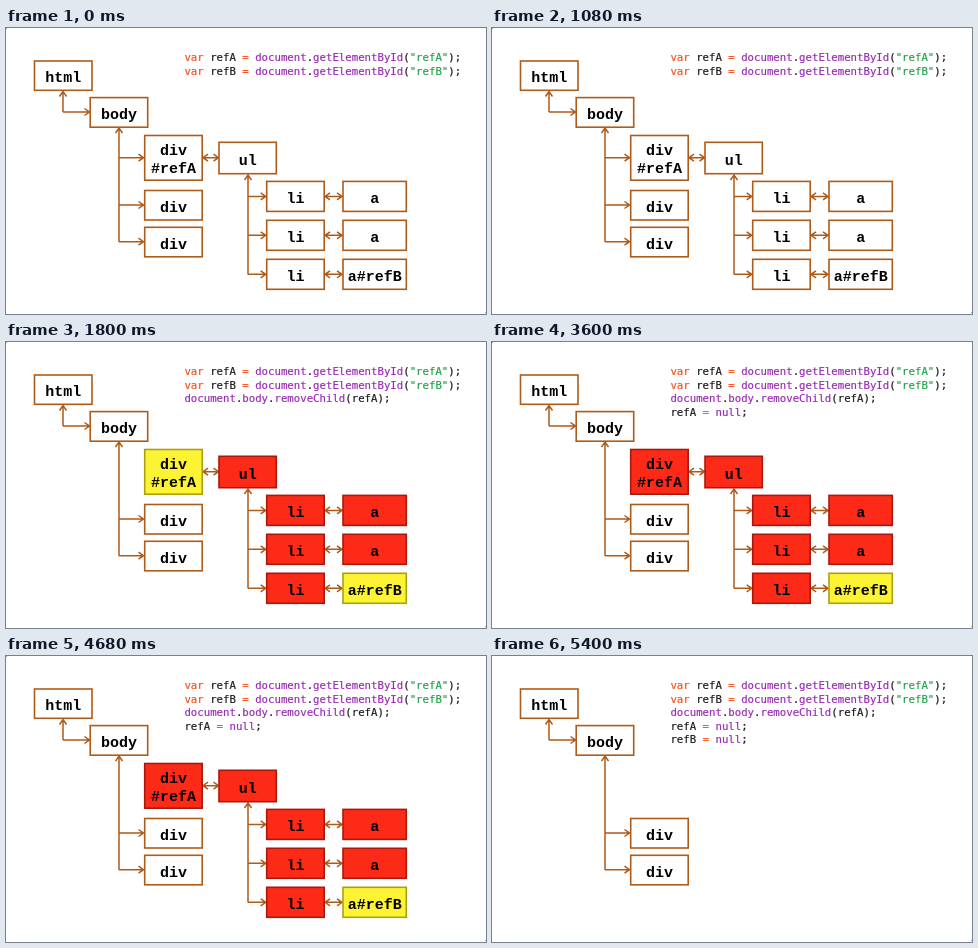
These frames come from a looping animation (480 by 286 pixels, 7.2 s). An HTML page:

```html
<!DOCTYPE html>
<html lang="en">
<head>
<meta charset="utf-8">
<title>Detached DOM nodes</title>
<style>
html, body { margin: 0; width: 100%; height: 100%; overflow: hidden; background: #fff; }
svg { display: block; width: 100%; height: 100%; }
.box { stroke-width: 1.6; }
.line { fill: none; stroke: #ae5a18; stroke-width: 1.5; }
.label { font: bold 15px "Liberation Mono", "Courier New", monospace; text-anchor: middle; fill: #000; }
.code { font: 10.7px "DejaVu Sans Mono", monospace; white-space: pre; fill: #1c1c1c; stroke: #1c1c1c; stroke-width: .2; }
.key { fill: #f4511e; stroke: #f4511e; }
.call { fill: #9a2bb5; stroke: #9a2bb5; }
.str { fill: #1fa34a; stroke: #1fa34a; }
</style>
</head>
<body>
<svg id="stage" viewBox="0 0 480 286" preserveAspectRatio="none"></svg>
<script>
const stage = document.getElementById('stage');
const STEP = 1800, STEPS = 4;
const LOOK = {
  w: { fill: '#fff', stroke: '#ae5a18' },
  y: { fill: '#fcf335', stroke: '#aaa012' },
  r: { fill: '#fd2a18', stroke: '#a8180c' }
};
const timed = [];

function set(el, attrs) {
  for (const k in attrs) el.setAttribute(k, attrs[k]);
}

function add(tag, attrs, parent = stage, text) {
  const el = document.createElementNS('http://www.w3.org/2000/svg', tag);
  set(el, attrs);
  if (text) el.textContent = text;
  return parent.appendChild(el);
}

// plan: one letter per step, a look or "-" for hidden
function group(plan) {
  const el = add('g', {});
  timed.push({ el, plan });
  return el;
}

function node(x, y, w, h, lines, plan = 'wwww') {
  const g = group(plan);
  add('rect', { class: 'box', x, y, width: w, height: h }, g);
  const top = y + h / 2 + 6.5 - (lines.length - 1) * 9;
  lines.forEach((t, i) => add('text', { class: 'label', x: x + w / 2, y: top + i * 18 }, g, t));
}

function head(x, y, dx, dy) {
  const bx = x - dx * 5, by = y - dy * 5;
  return `M${bx - dy * 3.5} ${by - dx * 3.5}L${x} ${y}L${bx + dy * 3.5} ${by + dx * 3.5}`;
}

function path(d, plan = 'wwww') {
  add('path', { class: 'line', d }, group(plan));
}

function trunk(x, top, bottom, plan) {
  path(`M${x} ${top}V${bottom}` + head(x, top, 0, -1), plan);
}

function branch(x, y, end, plan) {
  path(`M${x} ${y}H${end}` + head(end, y, 1, 0), plan);
}

function link(a, b, y, plan) {
  path(`M${a} ${y}H${b}` + head(a, y, -1, 0) + head(b, y, 1, 0), plan);
}

trunk(57, 63.5, 84);
branch(57, 84, 83.5);
trunk(113, 100, 214);
branch(113, 129.7, 137.5, 'w---');
branch(113, 177, 137.5);
branch(113, 213.7, 137.5);
link(197, 212.5, 129.7, 'www-');
trunk(242, 147, 246.5, 'www-');

node(28.5, 33, 57.5, 29.3, ['html']);
node(84.2, 69.6, 57.5, 29.6, ['body']);
node(138.7, 107.5, 57.5, 44.7, ['div', '#refA'], 'wyr-');
node(138.7, 162.5, 57.5, 29.5, ['div']);
node(138.7, 199.3, 57.5, 29.5, ['div']);
node(213, 114.3, 57.3, 31.4, ['ul'], 'wrr-');

[168.4, 207.3, 246.3].forEach((y, i) => {
  branch(242, y, 259.7, 'www-');
  link(319, 336, y, 'www-');
  node(260.7, y - 15, 57.5, 30, ['li'], 'wrr-');
  node(337, y - 15, 63.3, 30, [i < 2 ? 'a' : 'a#refB'], i < 2 ? 'wrr-' : 'wyy-');
});

// code lines: [class, text] runs
const chain = (...names) => names.flatMap((n, i) => i ? [['', '.'], ['call', n]] : [['call', n]]);
const fetchRef = name => [
  ['key', 'var'], ['', ` ${name} `], ['key', '= '], ...chain('document', 'getElementById'),
  ['', '('], ['str', `"${name}"`], ['', ');']
];
const clearRef = name => [['', `${name} `], ['key', '= '], ['call', 'null'], ['', ';']];
const code = [
  [fetchRef('refA'), 'wwww'],
  [fetchRef('refB'), 'wwww'],
  [[...chain('document', 'body', 'removeChild'), ['', '(refA);']], '-www'],
  [clearRef('refA'), '--ww'],
  [clearRef('refB'), '---w']
];
code.forEach(([runs, plan], i) => {
  const text = add('text', { class: 'code', x: 178.4, y: 33.3 + i * 13.5 }, group(plan));
  runs.forEach(([cls, t]) => add('tspan', { class: cls }, text, t));
});

// faint corner specks
add('rect', { x: 0, y: 0, width: 1, height: 1, fill: '#999' }, group('www-'));
add('rect', { x: 479, y: 284, width: 1, height: 1, fill: '#aaa' });

let shown = -1;
function draw(now) {
  const step = Math.floor(now / STEP) % STEPS;
  if (step === shown) return;
  shown = step;
  for (const { el, plan } of timed) {
    const look = LOOK[plan[step]];
    set(el, { visibility: look ? 'visible' : 'hidden' });
    if (look) el.querySelectorAll('.box').forEach(box => set(box, look));
  }
}

const start = performance.now();
function tick() {
  draw(performance.now() - start);
  requestAnimationFrame(tick);
}
tick();
</script>
</body>
</html>
```
